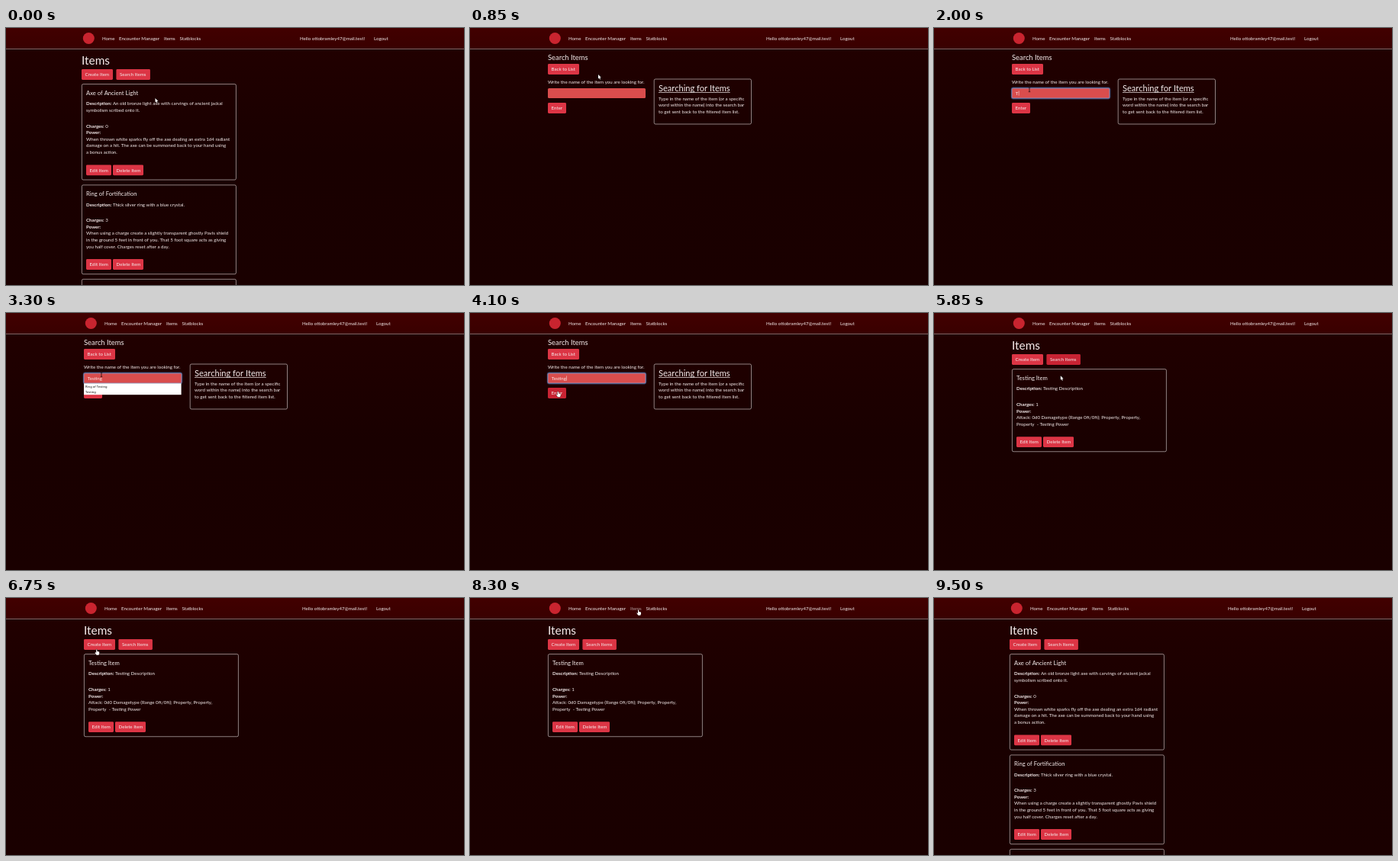
These frames come from a looping animation (600 px wide and 337 px high, 9550 ms). An HTML page with a canvas:

```html
<!DOCTYPE html>
<html lang="en">
<head>
<meta charset="utf-8">
<title>Item search</title>
<style>
html, body { margin: 0; width: 100%; height: 100%; overflow: hidden; background: #1a0000; }
canvas { display: block; width: 600px; height: 337px; }
</style>
</head>
<body>
<canvas id="stage"></canvas>
<script>
const W = 600, H = 337, LOOP = 9550, STEP = 50;
const BODY = 6.15, LINE = 8.65, BUTTON_H = 13.8;
const WHITE = '#f4ecec', RED = '#dc3545', RED_HOVER = '#c82333', BORDER = 'rgba(255,255,255,.68)';

const canvas = document.getElementById('stage');
const ctx = canvas.getContext('2d');
const dpr = window.devicePixelRatio || 1;
canvas.width = W * dpr;
canvas.height = H * dpr;

// Pointer stops: time, x, y
const path = [
  [250, 195.5, 92], [650, 168, 61], [950, 168, 61], [1500, 125, 81],
  [3500, 125, 81], [4000, 115.2, 103], [5150, 115.2, 103], [5500, 166, 61],
  [5750, 166, 61], [6100, 165, 168], [6220, 165, 168], [6400, 126, 168],
  [6720, 118.7, 67.4], [7200, 118.7, 67.4], [7850, 220.5, 15.5]
];
const SEARCH_AT = 800, RESULT_AT = 4300, LIST_AT = 8600;
const FOCUS_AT = 1600, MENU_AT = 2150, MENU_END = 3500;
const keyTimes = [1950, 2100, 2250, 2350, 2500, 2600, 2700];

const axeCard = {
  title: 'Axe of Ancient Light', charges: 0,
  about: ['An old bronze light axe with carvings of ancient jackal', 'symbolism scribed onto it.'],
  power: ['When thrown white sparks fly off the axe dealing an extra 1d4 radiant',
    'damage on a hit. The axe can be summoned back to your hand using', 'a bonus action.']
};
const ringCard = {
  title: 'Ring of Fortification', charges: 3,
  about: ['Thick silver ring with a blue crystal.'],
  power: ['When using a charge create a slightly transparent ghostly Pavis shield',
    'in the ground 5 feet in front of you. That 5 foot square acts as giving',
    'you half cover. Charges reset after a day.']
};
const testCard = {
  title: 'Testing Item', charges: 1,
  about: ['Testing Description'],
  power: ['Attack: 0d0 Damagetype (Range 0ft/0ft); Property, Property,', 'Property  - Testing Power']
};

let pointer, lagged, shift, shape;

function pointerAt(t) {
  const i = path.findIndex(stop => stop[0] > t);
  if (i < 0) return path[path.length - 1].slice(1);
  if (i === 0) return path[0].slice(1);
  const [t0, x0, y0] = path[i - 1], [t1, x1, y1] = path[i];
  const p = (t - t0) / (t1 - t0), e = p * p * (3 - 2 * p);
  return [x0 + (x1 - x0) * e, y0 + (y1 - y0) * e];
}

function inside([px, py], x, y, w, h) {
  return px - shift >= x && px - shift <= x + w && py >= y && py <= y + h;
}

// y is the vertical middle of the line; returns the right edge
function text(str, x, y, size = BODY, color = WHITE, weight = 400, family = 'Lato') {
  ctx.font = `${weight} ${size}px ${family}, sans-serif`;
  ctx.fillStyle = color;
  ctx.fillText(str, x, y + size * .37);
  return x + ctx.measureText(str).width;
}

function labelled(label, value, x, y) {
  const end = text(label, x, y, BODY, WHITE, 700);
  text(value, end + 1.5, y);
}

function box(x, y, w, h, r, fill, stroke, width = .75) {
  ctx.beginPath();
  ctx.roundRect(x, y, w, h, r);
  if (fill) { ctx.fillStyle = fill; ctx.fill(); }
  if (stroke) { ctx.strokeStyle = stroke; ctx.lineWidth = width; ctx.stroke(); }
}

function button(label, x, y, w) {
  if (inside(pointer, x, y, w, BUTTON_H)) shape = 'hand';
  box(x, y, w, BUTTON_H, 1.4, inside(lagged, x, y, w, BUTTON_H) ? RED_HOVER : RED);
  text(label, x + 4.6, y + BUTTON_H / 2 + .1);
}

function background() {
  const g = ctx.createLinearGradient(0, 28, 0, H);
  g.addColorStop(0, '#210000');
  g.addColorStop(.45, '#190000');
  g.addColorStop(1, '#1a0000');
  ctx.fillStyle = g;
  ctx.fillRect(0, 0, W, H);
  const nav = ctx.createLinearGradient(0, 0, 0, 27);
  nav.addColorStop(0, '#420000');
  nav.addColorStop(1, '#390000');
  ctx.fillStyle = nav;
  ctx.fillRect(0, 0, W, 27);
  ctx.fillStyle = 'rgba(255,255,255,.5)';
  ctx.fillRect(0, 27, W, .8);
}

function navbar() {
  ctx.fillStyle = '#c9242f';
  ctx.beginPath();
  ctx.arc(108.3, 13.5, 7.5, 0, Math.PI * 2);
  ctx.fill();
  const links = [['Home', 126, 16], ['Encounter Manager', 148, 53], ['Items', 207, 15], ['Statblocks', 227.5, 28], ['Logout', 482, 19]];
  for (const [label, x, w] of links) {
    const over = inside(pointer, x, 8, w, 12);
    if (over) shape = 'hand';
    text(label, x, 13.9, BODY, over ? 'rgba(255,255,255,.6)' : WHITE);
  }
  text('Hello ottobramley47@mail.test!', 385, 13.5);
}

function card(item, top) {
  const x = 105;
  let y = top + 25.5;
  text(item.title, x, top + 11.2, 7.65);
  labelled('Description:', item.about[0], x, y);
  for (const line of item.about.slice(1)) text(line, x, y += LINE);
  labelled('Charges:', item.charges, x, y += 20.5);
  text('Power:', x, y += LINE, BODY, WHITE, 700);
  for (const line of item.power) text(line, x, y += LINE);
  button('Edit Item', x, y + 16.6, 33);
  button('Delete Item', x + 35, y + 16.6, 40);
  box(99.4, top, 202, y + 36.2 - top, 1.8, null, BORDER);
}

function itemsHeader() {
  text('Items', 99, 42.7, 15.4);
  button('Create Item', 99, 54.1, 41);
  button('Search Items', 144.4, 54.1, 44.5);
}

function listPage() {
  itemsHeader();
  card(axeCard, 73.6);
  card(ringCard, 205.9);
  box(99.4, 329.4, 202, 120, 1.8, null, BORDER);
}

function resultPage() {
  itemsHeader();
  card(testCard, 73.6);
}

function searchPage(t) {
  text('Search Items', 99, 39, 9.4);
  button('Back to List', 99, 47.1, 41);
  text('Write the name of the item you are looking for.', 99, 71.2);

  const focused = t >= FOCUS_AT && t < 4200;
  if (focused) box(98.8, 78.6, 128.4, 13.8, 2, null, 'rgba(90,140,220,.45)', 2);
  box(99, 79, 128, 13, 1.5, '#d94d4d', focused ? '#7fa5dc' : null, .7);
  if (inside(pointer, 99, 79, 128, 13)) shape = 'beam';

  const count = keyTimes.filter(k => k <= t).length;
  const end = text('Testing'.slice(0, count), 103.8, 85.5, BODY, '#fbe6e6');
  const since = t - (count ? keyTimes[count - 1] : FOCUS_AT);
  if (focused && since % 1000 < 500) {
    ctx.fillStyle = WHITE;
    ctx.fillRect(end + .4, 82.4, .5, 6.2);
  }

  button('Enter', 99, 98.1, 24);
  if (t >= MENU_AT && t < MENU_END) {
    ctx.fillStyle = '#fff';
    ctx.fillRect(99, 92.3, 127.6, 14.9);
    text('Ring of Testing', 101, 96.3, 4.1, '#111', 400, 'Noto Sans');
    text('Testing', 101, 103.5, 4.1, '#111', 400, 'Noto Sans');
  }

  box(238.2, 67, 127.3, 59, 1.8, null, BORDER);
  const right = text('Searching for Items', 244, 79, 11.1);
  ctx.fillRect(244, 84, right - 244, .7);
  ['Type in the name of the item (or a specific', 'word within the name) into the search bar', 'to get sent back to the filtered item list.']
    .forEach((line, i) => text(line, 244, 92.4 + i * LINE));
}

function polygon(points, fill, stroke, width) {
  ctx.beginPath();
  for (const [x, y] of points) ctx.lineTo(x, y);
  ctx.closePath();
  ctx.strokeStyle = stroke;
  ctx.lineWidth = width;
  ctx.stroke();
  ctx.fillStyle = fill;
  ctx.fill();
}

function drawPointer() {
  ctx.save();
  ctx.translate(pointer[0], pointer[1]);
  ctx.lineJoin = 'round';
  if (shape === 'beam') {
    ctx.fillStyle = '#1a0808';
    ctx.fillRect(-.4, -2.8, .8, 5.6);
    ctx.fillRect(-1.3, -3.1, 2.6, .6);
    ctx.fillRect(-1.3, 2.5, 2.6, .6);
  } else if (shape === 'hand') {
    polygon([[-.5, 0], [.5, 0], [.8, 2.5], [3.4, 3.1], [3.6, 5], [2.8, 7.3], [-.2, 7.3], [-2.2, 4.3], [-1.6, 3.7], [-.5, 4.7]], '#fff', '#200000', .7);
  } else {
    polygon([[0, 0], [0, 5.5], [1.2, 4.5], [2.1, 6.5], [3, 6.1], [2.2, 4.1], [3.8, 4]], '#fff', '#100000', .7);
  }
  ctx.restore();
}

function render(t) {
  const onList = t < SEARCH_AT || t >= LIST_AT;
  const hidden = t >= LIST_AT;
  pointer = hidden ? [-50, -50] : pointerAt(t);
  lagged = hidden ? pointer : pointerAt(Math.max(0, t - 100));
  // Without a scrollbar the centred layout sits 3px further right
  shift = onList ? 0 : 3;
  shape = 'arrow';

  ctx.setTransform(dpr, 0, 0, dpr, 0, 0);
  background();
  ctx.save();
  ctx.translate(shift, 0);
  navbar();
  if (onList) listPage();
  else if (t < RESULT_AT) searchPage(t);
  else resultPage();
  ctx.restore();
  if (!hidden) drawPointer();
}

function tick() {
  const t = performance.now() % LOOP;
  render(Math.floor(t / STEP) * STEP);
  requestAnimationFrame(tick);
}
tick();
</script>
</body>
</html>
```
